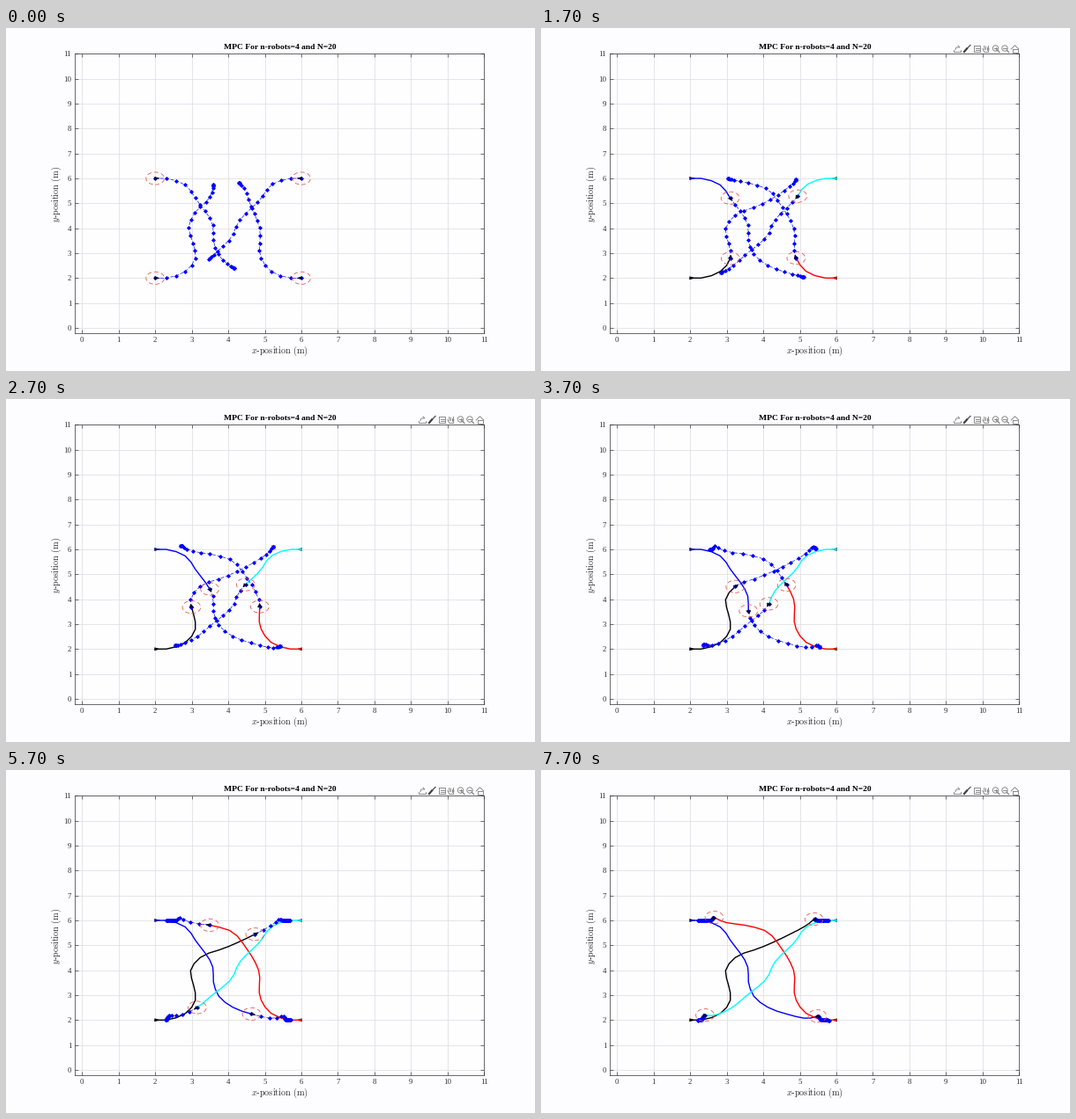
Write a matplotlib script that moves like this. It is 600x390 px and loops after 8000 ms.

```python
import numpy as np
import matplotlib.pyplot as plt
from matplotlib.animation import FuncAnimation
from matplotlib.patches import Ellipse, Polygon

plt.rcParams.update({"font.family": "Liberation Serif", "mathtext.fontset": "cm"})

W, H, DPI = 600, 390, 100
PX = 72 / DPI
DARK, GRAY = "#303030", "#838383"
HORIZON = 20      # steps each plan looks ahead
TRAVEL = 20       # steps needed to reach the goal area
START_BEND = np.array([(0, 0), (0.3, 0), (0.83, 0.27), (1.1, 0.8)])


def smooth_curve(points, per_span=30):
    """Cubic Hermite curve through a few points, spaced by chord length."""
    points = np.asarray(points, float)
    chord = np.hypot(*np.diff(points, axis=0).T)
    knots = np.append(0, np.cumsum(chord))
    slope = np.gradient(points, knots, axis=0)
    t = np.linspace(0, 1, per_span)[:, None]
    spans = [(1 + 2 * t) * (1 - t) ** 2 * points[i] + t * (1 - t) ** 2 * h * slope[i]
             + t * t * (3 - 2 * t) * points[i + 1] + t * t * (t - 1) * h * slope[i + 1]
             for i, h in enumerate(chord)]
    return np.concatenate(spans)


def arc_length(points):
    return np.append(0, np.cumsum(np.hypot(*np.diff(points, axis=0).T)))


def soft_min(value, limit, sharpness=3):
    """Follows value, easing to rest at limit."""
    return limit - np.logaddexp(0, sharpness * (limit - value)) / sharpness


def triangle(pos, angle):
    shape = np.array([(0.14, 0), (-0.02, 0.07), (-0.02, -0.07)])
    c, s = np.cos(angle), np.sin(angle)
    return shape @ np.array([(c, s), (-s, c)]) + pos


class Robot:
    def __init__(self, ax, start, via, drift, color, mark):
        start = np.array(start)
        goal = 8 - start
        inward = np.sign(4 - start)
        route = smooth_curve(np.vstack([start + inward * START_BEND, via]))
        # Past the last point the plan hooks onto the goal line.
        hook = (via[-1][0] + 0.08 * inward[0], goal[1])
        stop = (goal[0] - 0.15 * inward[0], goal[1] - 0.01)
        self.curve = np.vstack([route, hook, stop])
        self.length = arc_length(self.curve)
        self.arrival = self.length[len(route) - 1]
        self.speed = self.arrival / TRAVEL
        self.drift = np.array(drift)

        ring_style = dict(fill=False, ec="#e4544a", lw=0.8 * PX, ls=(0, (6, 4)))
        self.mark = ax.add_patch(Polygon(triangle(start, self.heading(0)),
                                         fc=mark, ec="none", zorder=3))
        self.trail, = ax.plot([], [], color=color, lw=1.4 * PX, zorder=4)
        self.plan, = ax.plot([], [], color="blue", lw=0.65 * PX, dashes=(6, 3),
                             marker=(8, 2, 0), ms=4.6 * PX, mew=0.5 * PX, zorder=5)
        self.body = ax.add_patch(Polygon(triangle(start, 0), fc="#000030",
                                         ec="none", zorder=6))
        self.ring = ax.add_patch(Ellipse(start, 0.5, 0.5, zorder=7, **ring_style))

    def at(self, distance):
        return np.stack([np.interp(distance, self.length, c) for c in self.curve.T], axis=-1)

    def travelled(self, step):
        return soft_min(self.speed * step, self.arrival)

    def heading(self, k):
        d = self.travelled(k)
        dx, dy = self.at(d + 0.1) - self.at(d)
        return np.arctan2(dy, dx)

    def predict(self, k):
        j = np.arange(HORIZON + 1)
        rest = self.length[-1] - 1.9 * np.exp(-k / 6.5)
        distance = soft_min(self.speed * (k + j), min(rest, self.arrival))
        distance += max(rest - self.arrival, 0) * j / HORIZON
        # Early plans end away from the route driven later.
        progress = (distance - distance[0]) / (distance[-1] - distance[0])
        return self.at(distance) + np.outer(progress ** 5, self.drift * np.exp(-k / 4.5))

    def show(self, k):
        pos = self.at(self.travelled(k))
        self.trail.set_data(*self.at(self.travelled(np.arange(k + 1))).T)
        self.plan.set_data(*self.predict(k).T)
        self.body.set_xy(triangle(pos, self.heading(k)))
        self.ring.center = pos
        self.mark.set_visible(k > 0)


fig = plt.figure(figsize=(W / DPI, H / DPI), dpi=DPI, facecolor="#fdfcfe")
LEFT, RIGHT, TOP, BOTTOM = 78.0, 542.3, 29.4, 346.6
ax = fig.add_axes([LEFT / W, 1 - BOTTOM / H, (RIGHT - LEFT) / W, (BOTTOM - TOP) / H])
ax.set(xlim=(-0.2, 11), ylim=(-0.2, 11), xticks=range(12), yticks=range(12),
       facecolor="#fefdff")
ax.set_axisbelow(True)
ax.grid(color="#e0e0e0", lw=0.8 * PX)
ax.tick_params(direction="in", top=True, right=True, length=4.4 * PX, width=0.65 * PX,
               color=DARK, labelcolor=DARK, labelsize=8.8 * PX, pad=3.8 * PX)
ax.tick_params(axis="x", pad=4.8 * PX)
for spine in ax.spines.values():
    spine.set(color=DARK, linewidth=0.7 * PX)

overlay = fig.add_axes([0, 0, 1, 1])
overlay.set(xlim=(0, W), ylim=(H, 0))
overlay.axis("off")


def label(x, y, text, size, **style):
    overlay.text(x, y, text, size=size * PX, ha="center", va="center", **style)


label(311.2, 22.3, "MPC For n-robots=4 and N=20", 9.5, weight="bold")
label(310.5, 367, r"$x$-$\mathrm{position\ (m)}$", 10.2, color=DARK)
label(57.8, 188.5, r"$y$-$\mathrm{position\ (m)}$", 10.2, color=DARK, rotation=90)

tools = []


def stroke(*points, width=0.9, color=GRAY):
    tools.extend(overlay.plot(*zip(*points), color=color, lw=width * PX))


def box(x, y, w, h):
    stroke((x, y), (x + w, y), (x + w, y + h), (x, y + h), (x, y))


def lens(x, y):
    """Magnifier with a minus inside."""
    tools.append(overlay.add_patch(Ellipse((x, y), 6.4, 6.4, fill=False, ec=GRAY, lw=0.9 * PX)))
    stroke((x + 2.3, y + 2.3), (x + 4.5, y + 4.6), width=1.3)
    stroke((x - 1.6, y), (x + 1.6, y))


def draw_tools(y=23.5):
    stroke((468, y + 1), (468, y + 3), (476, y + 3), (476, y + 1))      # export
    stroke((470, y + 1), (471, y - 1.5), (475, y - 1.5), (473, y - 3.5))
    stroke((487, y - 4), (483, y), width=1.3, color="#505050")          # brush
    stroke((483, y), (480, y + 3.5), width=2.2, color="#404040")
    box(491, y - 3.5, 7, 7)                                             # data tip
    stroke((493, y - 1), (496.5, y - 1))
    stroke((493, y + 1.5), (496.5, y + 1.5))
    for i in range(4):                                                  # hand
        stroke((502.7 + 1.6 * i, y - 3 + 0.5 * (i % 3)), (502.9 + 1.5 * i, y + 1))
    stroke((500.8, y), (503, y + 4), (507.5, y + 4), (508, y))
    lens(515.5, y - 0.5)                                                # zoom in, out
    stroke((515.5, y - 2), (515.5, y + 1))
    lens(526, y - 0.5)
    stroke((533.2, y + 0.5), (537.5, y - 3.8), (541.8, y + 0.5))        # home
    box(534.6, y, 6, 4)


draw_tools()

robots = [
    Robot(ax, (2, 2), [(3.05, 3.4), (2.97, 4), (3.25, 4.53), (3.92, 4.9),
                       (4.68, 5.41), (5.28, 5.91), (5.4, 6.07)],
          drift=(-0.73, 0.6), color="black", mark="black"),
    Robot(ax, (2, 6), [(3.58, 4.1), (3.6, 3.48), (3.76, 2.92), (4.14, 2.5),
                       (4.67, 2.23), (5.3, 2.08), (5.5, 2.17)],
          drift=(0, -0.1), color="blue", mark="black"),
    Robot(ax, (6, 2), [(4.83, 4), (4.5, 4.87), (4.06, 5.58), (3.52, 5.8),
                       (2.9, 5.95), (2.64, 6.13)],
          drift=(0.4, 0.15), color="red", mark="#5a2410"),
    Robot(ax, (6, 6), [(4.26, 4.2), (4.13, 3.75), (3.56, 3), (3, 2.38),
                       (2.6, 2.18), (2.38, 2.2)],
          drift=(-0.1, -0.25), color="cyan", mark="#1d5a4a"),
]

INTERVAL, FRAMES = 100, 80
TOOLS_FROM = 3


def update(frame):
    # The controller runs at three steps per second.
    k = int((frame * INTERVAL + 34) * 3 / 1000)
    for robot in robots:
        robot.show(k)
    for item in tools:
        item.set_visible(k >= TOOLS_FROM)
    return []


anim = FuncAnimation(fig, update, frames=FRAMES, interval=INTERVAL,
                     init_func=lambda: [], repeat=True, repeat_delay=0, blit=False)
plt.show()
```
